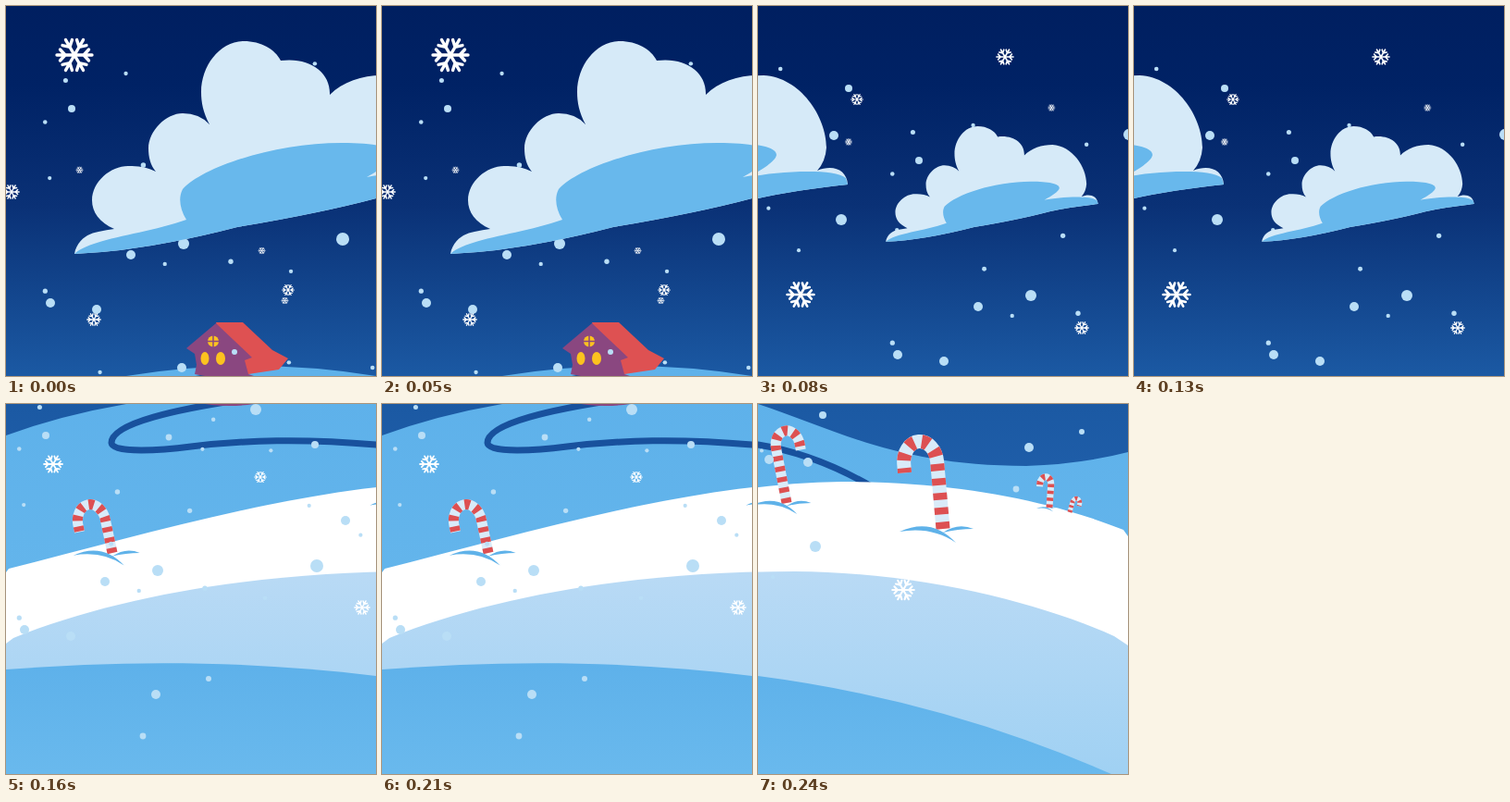
Recreate the animation shown at these times as an HTML page. Size 400x400 px, loop 320 ms.

```html
<!DOCTYPE html>
<html lang="en">
<head>
<meta charset="utf-8">
<title>Winter night</title>
<style>
  html, body { margin: 0; width: 100%; height: 100%; overflow: hidden; background: #001f62; }
  #view { position: relative; width: 400px; height: 400px; overflow: hidden; }
  #scene { position: absolute; left: 0; top: 0; display: block; }
</style>
</head>
<body>
<div id="view">
<svg id="scene" width="800" height="800" viewBox="0 0 800 800">
  <defs>
    <linearGradient id="sky" x1="0" y1="0" x2="0" y2="480" gradientUnits="userSpaceOnUse">
      <stop offset="0" stop-color="#001f60"/>
      <stop offset=".18" stop-color="#002265"/>
      <stop offset=".45" stop-color="#0a3176"/>
      <stop offset=".83" stop-color="#1b59a3"/>
      <stop offset="1" stop-color="#1f5ea9"/>
    </linearGradient>
    <linearGradient id="slope" x1="0" y1="0" x2="0" y2="1">
      <stop offset="0" stop-color="#b9daf5"/>
      <stop offset="1" stop-color="#a0d1f3"/>
    </linearGradient>
    <linearGradient id="front" x1="0" y1="0" x2="0" y2="1">
      <stop offset="0" stop-color="#5eb1ea"/>
      <stop offset="1" stop-color="#69b9ed"/>
    </linearGradient>
    <g id="flake" fill="none" stroke="#fff" stroke-width="3.4" stroke-linecap="round"></g>
    <g id="cloud">
      <path fill="#d6eaf8" d="M74 268C76 255 87 246 100 244Q109 242 117 241C101 234 93 223 93 210C93 190 113 173 132 173Q149 172 162 179C156 172 154 163 154 154C154 135 173 116 191 116Q209 116 220 128C213 115 211 104 211 93C211 65 231 38 257 38C276 38 291 47 297 59C329 55 351 72 350 96C364 82 385 75 406 75C446 77 474 120 474 153Q473 168 464 178C481 171 496 177 497 193Q440 199 400 208Q340 224 250 239Q150 265 74 268Z"/>
      <path fill="#68b8ec" d="M74 268C92 251 150 247 195 231C188 220 186 207 191 198C213 174 290 148 363 148C398 148 420 152 420 161C419 168 404 177 390 185C420 179 482 175 495 186L497 193Q440 199 400 208Q340 224 250 239Q150 265 74 268Z"/>
    </g>
  </defs>

  <rect width="800" height="800" fill="url(#sky)"/>
  <path fill="url(#front)" d="M0 434Q60 412 130 400Q265 378 400 400C485 428 550 467 690 467Q750 465 800 452V800H0Z"/>
  <path fill="none" stroke="#18519d" stroke-width="7" d="M250 396C190 405 114 420 114 442C115 454 170 450 200 446C260 439 320 437 400 444C450 452 490 470 524 490"/>

  <g id="house">
    <path fill="#de5152" d="M227 342H256L288 372L305 381L295 393L262 398L240 396Z"/>
    <path fill="#8a4780" d="M227 343L195 370L204 376L206 388L204 398Q236 405 268 400L262 398L258 383L266 380Z"/>
    <circle cx="224" cy="362.500" r="6" fill="#fcc21f"/>
    <path stroke="#8a4780" stroke-width="1.500" d="M224 356V369M218 362.500H230"/>
    <ellipse cx="215" cy="381" rx="4.500" ry="7" fill="#fcc21f"/>
    <ellipse cx="232" cy="381" rx="5" ry="7" fill="#fcc21f"/>
  </g>

  <path fill="#fff" d="M0 582L3 578C150 541 330 486 490 484C620 484 720 506 795 536L800 543V800H0Z"/>
  <path fill="url(#slope)" d="M0 659L8 653C120 607 280 581 440 581C580 582 710 617 785 651L800 661V800H0Z"/>
  <path fill="url(#front)" d="M0 687C130 677 260 677 400 694Q600 720 782 800H0Z"/>

  <g id="canes" fill="none"></g>
  <g id="snow" fill="#b9def6"></g>
  <g id="flakes"></g>

  <use href="#cloud"/>
  <use href="#cloud" transform="translate(498 109.400) scale(.5425)"/>
</svg>
</div>
<script>
const $ = id => document.getElementById(id);
function add(parent, tag, attrs) {
  const el = document.createElementNS('http://www.w3.org/2000/svg', tag);
  for (const key in attrs) el.setAttribute(key, attrs[key]);
  return parent.appendChild(el);
}

let seed = 7;
const random = (min, max) => {
  const v = Math.sin(++seed * 12.9898) * 43758.5453;
  return min + (v - Math.floor(v)) * (max - min);
};

// A cane is a leaning stem, a half-ellipse hook (side -1 left, 1 right) and a short tail
function cane({ x, y, lean, stem, hook, side, width, drift }) {
  const g = add($('canes'), 'g', { transform: `translate(${x} ${y})` });
  const d = `M0 0V${-stem}a${hook} ${hook * 1.3} 0 0 ${side > 0 ? 1 : 0} ${side * 2 * hook} 0v${hook / 2}`;
  const shape = { d, transform: `rotate(${lean})`, 'stroke-width': width };
  add(g, 'path', { ...shape, stroke: '#d9ebf9' });
  add(g, 'path', { ...shape, stroke: '#dd5052', 'stroke-dasharray': `${width / 2} ${width * 0.55}` });
  add(g, 'path', {
    d: 'M-47 3Q-12 -13 14 15Q-12 -3 -47 3M0 4Q16 -7 33 0Q16 0 0 4',
    fill: '#5fb2e9', transform: `scale(${drift})`
  });
}
cane({ x: 115, y: 561, lean: -12, stem: 37, hook: 15, side: -1, width: 11, drift: 0.9 });
cane({ x: 431, y: 507, lean: -11, stem: 60, hook: 13, side: 1, width: 11, drift: 0.8 });
cane({ x: 600, y: 535, lean: -5, stem: 73, hook: 18, side: -1, width: 15, drift: 1 });
cane({ x: 715, y: 512, lean: 4, stem: 25, hook: 6, side: -1, width: 7, drift: 0.3 });
cane({ x: 737, y: 517, lean: 15, stem: 11, hook: 4, side: 1, width: 5, drift: 0 });

// Snowflake symbol, radius 21
for (let a = 0; a < 360; a += 60)
  add($('flake'), 'path', { d: 'M0 0H19M10 0L15.500 -6M10 0L15.500 6', transform: `rotate(${a})` });

const flake = (x, y, r) =>
  add($('flakes'), 'use', { href: '#flake', transform: `translate(${x} ${y}) scale(${r / 21})` });
[
  [74, 53, 21], [6, 201, 9], [95, 339, 8], [305, 307, 7], [667, 55, 10], [507, 101, 7],
  [446, 312, 16], [750, 348, 8], [51, 465, 11], [275, 479, 7], [385, 620, 9], [557, 601, 13]
].forEach(f => flake(...f));
for (let i = 0; i < 6; i++) flake(random(40 + 120 * i, 160 + 120 * i), random(10, 320), 4);

// Snow: large dots at key points, fine dots on a jittered grid, all repeated at offsets
function scatter(dots, offsets) {
  for (const [dx, dy] of offsets)
    for (const [x, y, r] of dots)
      add($('snow'), 'circle', { cx: x + dx, cy: y + dy, r });
}
const large = [
  [71, 111, 4], [135, 269, 5], [192, 257, 6], [364, 252, 7], [48, 321, 5], [98, 328, 5], [298, 83, 6],
  [362, 121, 4], [395, 203, 5], [498, 89, 4], [482, 140, 5], [490, 231, 6], [440, 137, 5]
];
const fine = [];
for (let x = 0; x < 480; x += 96)
  for (let y = 45; y < 300; y += 68)
    fine.push([x + random(15, 80), y + random(5, 60), random(2, 2.8)]);
scatter([...large, ...fine], [[0, 0], [503, 56], [-28, 323]]);
scatter([[218, 68, 5], [275, 51, 3], [204, 113, 3.4]], [[-28, 323], [475, 379], [-56, 646]]);

// The view jumps between the four quarters of the scene
const steps = [0, 1, 2, 3, 3].map((quarter, i) => ({
  transform: `translate(${-400 * (quarter % 2)}px, ${-400 * (quarter >> 1)}px)`,
  offset: i / 4,
  easing: 'step-end'
}));
$('scene').animate(steps, { duration: 320, iterations: Infinity });
</script>
</body>
</html>
```
